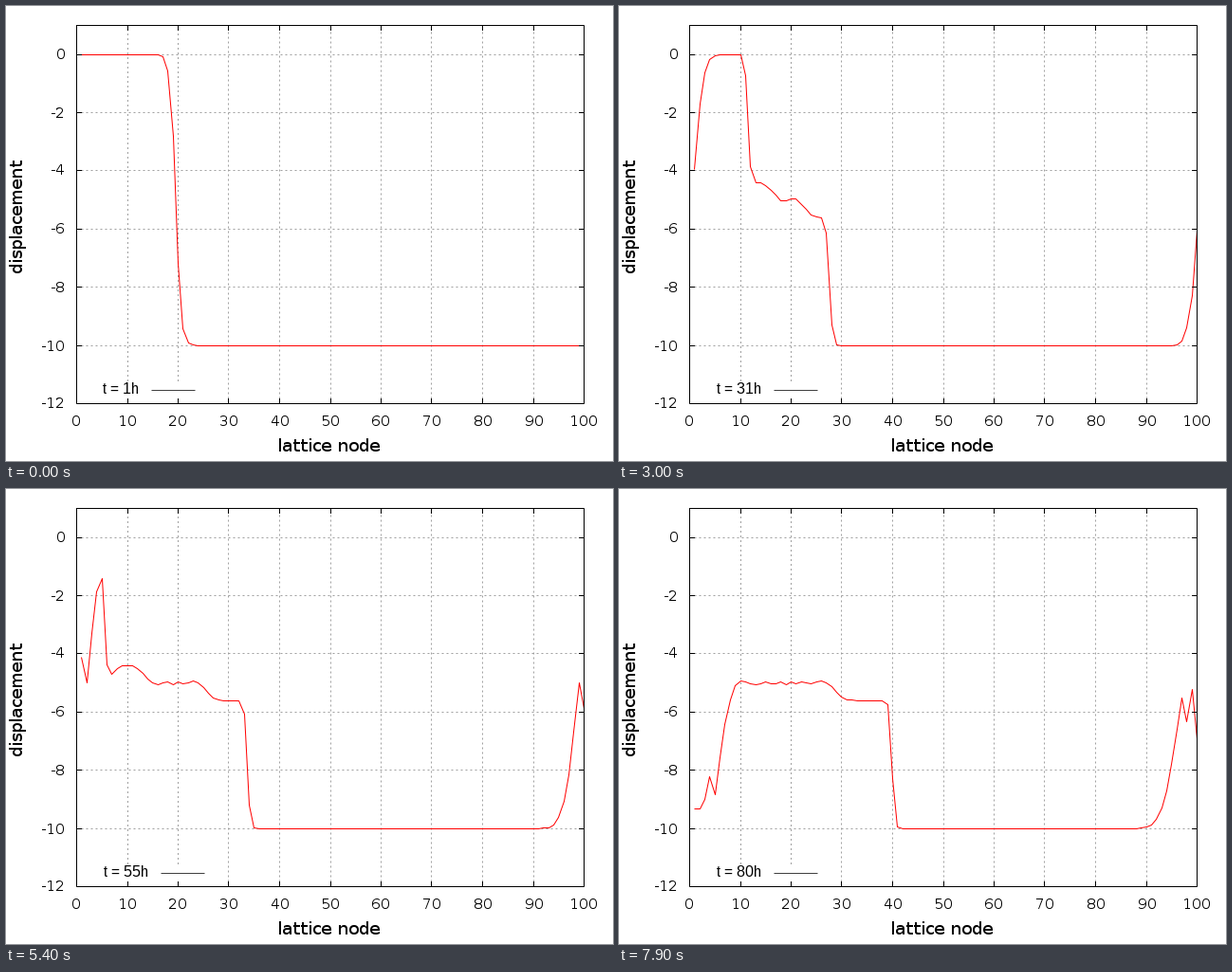
A matplotlib script that plays this animation: 640 by 480 pixels, repeating every 8 s.

```python
import numpy as np
import matplotlib.pyplot as plt
from matplotlib.animation import FuncAnimation

# full hinting gives crisp stems of whole pixels
plt.rcParams["text.hinting"] = "native"
plt.rcParams["text.hinting_factor"] = 1

FRAMES, INTERVAL = 80, 100
NODES, H = 100, 0.12
LEFT, RIGHT, TOP, BOTTOM = 74, 609, 20, 419
PX = 0.72  # points per pixel at 100 dpi


def accel(u):
    """Toda lattice with periodic ends."""
    push = np.exp(u - np.roll(u, -1))
    return np.roll(push, 1) - push


def simulate():
    """Verlet steps from a smooth step at rest."""
    n = np.arange(1, NODES + 1)
    u = -5 * (1 + np.tanh(0.94 * (n - 19.5)))
    states = [u]
    step = 0.5 * H**2 * accel(u)
    for _ in range(FRAMES - 1):
        u = u + step
        states.append(u)
        step = step + H**2 * accel(u)
    return n, states


def px_x(v):
    return np.round(LEFT + (RIGHT - LEFT) * np.asarray(v) / 100) + 0.5


def px_y(v):
    return np.round(TOP + (BOTTOM - TOP) * (1 - np.asarray(v)) / 13) + 0.5


fig = plt.figure(figsize=(6.4, 4.8), dpi=100, facecolor="white")
ax = fig.add_axes([0, 0, 1, 1])
ax.set_xlim(0, 640)
ax.set_ylim(480, 0)
ax.axis("off")


def line(xs, ys, color="black", **kw):
    # points already lie on pixel centres, so no snapping
    kw = {"zorder": 5, "solid_capstyle": "projecting", **kw}
    return ax.plot(xs, ys, color=color, lw=PX, snap=False, **kw)[0]


def label(x, y, s, size, font="DejaVu Sans", **kw):
    return ax.text(x, y, s, fontsize=size * PX, family=font,
                   va="baseline", rotation_mode="anchor", **kw)


def grid(xs, ys):
    line(xs, ys, "#a0a0a0", ls=(0, (2 / PX, 3 / PX)) if PX > 1 else (0, (2, 3)),
         dash_capstyle="butt", zorder=1)


x0, x1, y0, y1 = LEFT + 0.5, RIGHT + 0.5, TOP + 0.5, BOTTOM + 0.5

for v in range(0, 101, 10):
    x = px_x(v)
    if 0 < v < 100:
        # the grid leaves room for the key
        grid([x, x], [396 if v in (10, 20) else y1, y0])
        if v in (10, 20):
            grid([x, x], [y1, 414])
        line([x, x], [y0, y0 + 5])
        line([x, x], [y1, y1 - 5])
    label(x, 443, str(v), 14.67, ha="center")

for v in range(0, -13, -2):
    y = px_y(v)
    if v > -12:
        grid([x0, x1], [y, y])
        line([x0, x0 + 5], [y, y])
        line([x1, x1 - 5], [y, y])
    label(62.5, y + 5, str(v), 14.67, ha="right")

line([x0, x1, x1, x0, x0], [y0, y0, y1, y1, y0], solid_joinstyle="miter")
label(340.5, 470, "lattice node", 18.67, ha="center")
label(17, 221, "displacement", 18.67, ha="center", rotation=90)

nodes, states = simulate()
curve = line([], [], "red", zorder=4, solid_capstyle="butt")
key_text = label(140, 409, "", 16, "Liberation Sans", ha="right")
key_line = line([], [], "#404040")


def draw(i):
    shift = 10 if i >= 9 else 0
    curve.set_data(px_x(nodes), px_y(states[i]))
    key_text.set_text(f"t = {i + 1}h")
    key_text.set_x(140 + shift)
    key_line.set_data([154 + shift, 199 + shift], [405.5, 405.5])
    return curve, key_text, key_line


anim = FuncAnimation(fig, draw, frames=FRAMES, interval=INTERVAL,
                     repeat=True, repeat_delay=0, blit=False)
plt.show()
```
